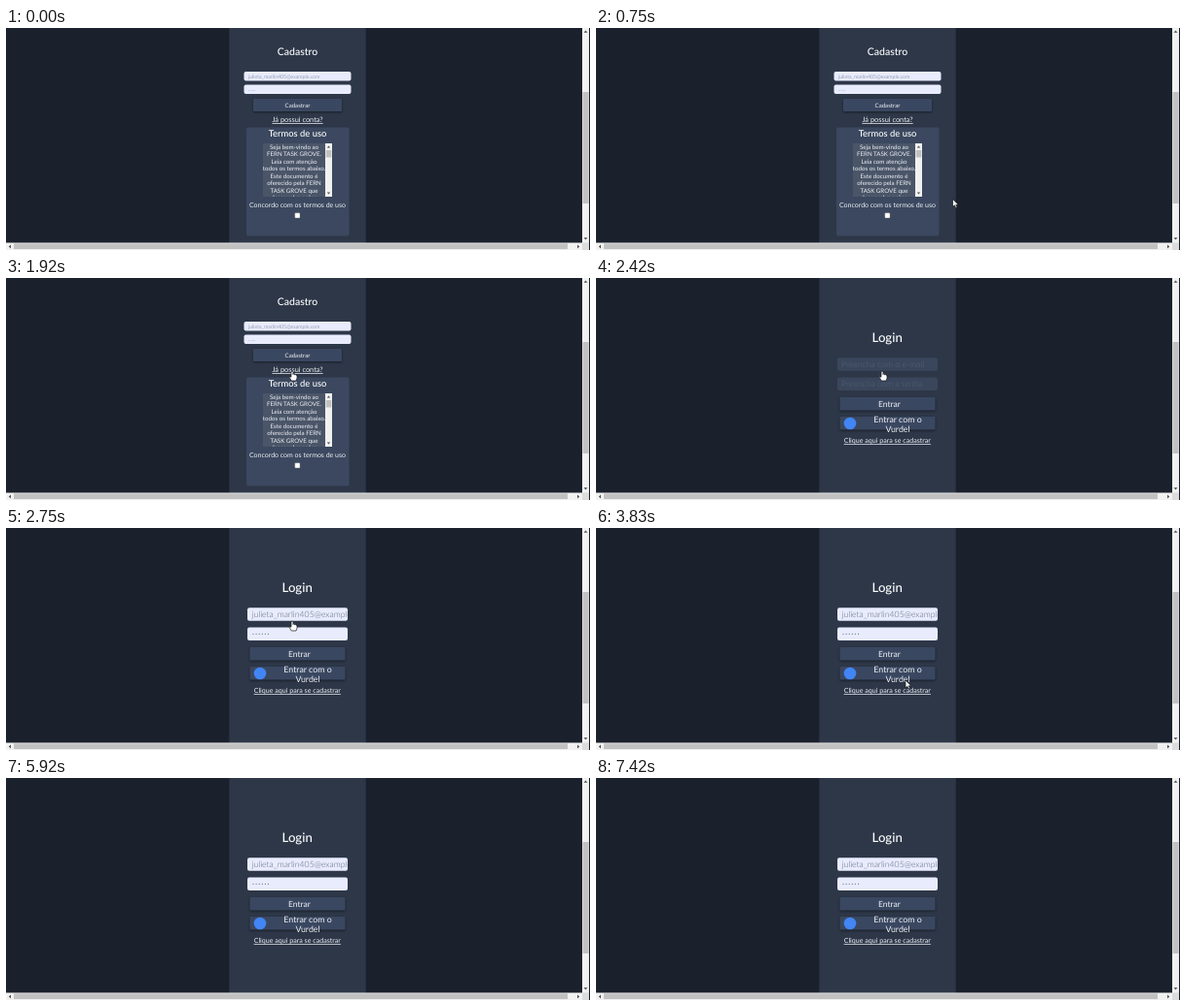
An HTML page that plays this animation: 600x229 px, repeating every 8000 ms.

```html
<!DOCTYPE html>
<html lang="pt">
<head>
<meta charset="utf-8">
<title>Cadastro e login</title>
<style>
  html, body { margin: 0; width: 100%; height: 100%; overflow: hidden; background: #1a202c; }
  svg { display: block; width: 100%; height: 100%; }
  text { font-family: Lato, "Open Sans", sans-serif; font-weight: 400; fill: #eef1f7; text-anchor: middle; text-rendering: geometricPrecision; }
  .title { font-weight: 500; fill: #fff; }
  .start { text-anchor: start; font-weight: 300; }
  .link { text-decoration: underline; text-decoration-thickness: .7px; }
  .filled { fill: #e8ecfd; }
  .empty { fill: #3a465b; }
  .typed { fill: #5c6579; }
  .hint { fill: #56647b; }
  .button { fill: #3a4760; filter: drop-shadow(0 1px 1px #0007); }
  .track { fill: #f1f1f1; }
  .thumb { fill: #c1c1c1; }
  .tick { fill: #505050; }
  #cursor path { fill: #fff; stroke: #15181f; stroke-width: .7; stroke-linejoin: round; }
</style>
</head>
<body>
<svg viewBox="0 0 600 229" preserveAspectRatio="none">
  <defs>
    <clipPath id="termsClip"><rect x="264" y="119" width="64" height="55"/></clipPath>
    <clipPath id="emailClip"><rect x="248" y="82" width="102.5" height="14"/></clipPath>
  </defs>
  <rect width="600" height="229" fill="#1a202c"/>
  <rect x="229.3" width="140.4" height="222" fill="#2d3748"/>

  <g id="signup">
    <text class="title" x="299.5" y="27.5" font-size="10.5">Cadastro</text>
    <rect class="filled" x="244.5" y="45" width="110" height="9.5" rx="2"/>
    <text class="start typed" x="249" y="52" font-size="5.3">julieta_marlin405@example.com</text>
    <rect class="filled" x="244.5" y="58.5" width="110" height="9.5" rx="2"/>
    <text class="start typed" x="249" y="64.5" font-size="5.3">......</text>
    <rect class="button" x="254" y="73" width="91" height="13" rx="1"/>
    <text x="299.5" y="81.5" font-size="6.1">Cadastrar</text>
    <text class="link" x="299.5" y="97" font-size="7.4">Já possui conta?</text>
    <rect x="247" y="102.5" width="105.5" height="112" rx="2" fill="#3b485f"/>
    <text class="title" x="299.5" y="112" font-size="9.4">Termos de uso</text>
    <rect x="264" y="119" width="64" height="55" fill="#4a5568"/>
    <g id="terms" clip-path="url(#termsClip)" font-size="6.2"></g>
    <rect class="track" x="328" y="119" width="7" height="55"/>
    <rect class="thumb" x="328.7" y="126" width="5.6" height="7.5"/>
    <path class="tick" d="M329.8 123.5l1.7-2 1.7 2zM329.8 169.5l1.7 2 1.7-2z"/>
    <text x="299.5" y="185" font-size="7">Concordo com os termos de uso</text>
    <rect x="296.8" y="190.8" width="5.2" height="5.2" rx=".7" fill="#fff" stroke="#767676" stroke-width=".4"/>
  </g>

  <g id="login">
    <text class="title" x="299.2" y="66.3" font-size="13.2">Login</text>
    <g id="blank">
      <rect class="empty" x="248" y="82.3" width="103" height="13.5" rx="2"/>
      <rect class="empty" x="248" y="102.5" width="103" height="13.5" rx="2"/>
      <g font-size="8.7">
        <text class="start hint" x="252" y="92.2">Preencha com o e-mail</text>
        <text class="start hint" x="252" y="112.2">Preencha com a senha</text>
      </g>
    </g>
    <g id="autofill">
      <rect class="filled" x="248" y="82.3" width="103" height="13.5" rx="2"/>
      <rect class="filled" x="248" y="102.5" width="103" height="13.5" rx="2"/>
      <g clip-path="url(#emailClip)">
        <text class="start typed" x="252.5" y="92.2" font-size="8.7">julieta_marlin405@example.com</text>
      </g>
      <path d="M254 109.3h16" stroke="#4a5263" stroke-width="1.1" stroke-linecap="round" stroke-dasharray="0 3.1"/>
    </g>
    <rect class="button" x="250.5" y="123" width="98" height="13.5" rx="1"/>
    <text x="301.5" y="133" font-size="8.5">Entrar</text>
    <rect class="button" x="250.5" y="143" width="98" height="13.5" rx="1"/>
    <circle cx="261" cy="150" r="6.3" fill="#4285f4"/>
    <text x="310" y="148.7" font-size="8.8">Entrar com o</text>
    <text x="310" y="159" font-size="8.8">Vurdel</text>
    <text class="link" x="299.3" y="170" font-size="7.1">Clique aqui para se cadastrar</text>
  </g>

  <rect class="track" x="592" width="7" height="222"/>
  <rect class="thumb" x="592.6" y="66" width="6" height="115"/>
  <rect class="track" y="221.5" width="599" height="7.5"/>
  <rect class="thumb" x="8" y="222.3" width="569" height="5.8"/>
  <rect x="592" y="221.5" width="7" height="7.5" fill="#dcdcdc"/>
  <path class="tick" d="M593.5 4.8l2-2.3 2 2.3zM593.5 216.2l2 2.3 2-2.3zM5 223.4l-2.2 2 2.2 2zM587 223.4l2.2 2-2.2 2z"/>

  <g id="cursor">
    <path id="arrow" d="M0 0V8L1.9 6.3 3.1 9 4.5 8.4 3.3 5.8H5.8Z"/>
    <path id="hand" d="M-1-.3Q0-1.7 1-.3V2.6Q2-1.1 2.6 2.9 3.6 2.1 4 3.3 5 2.9 5 4.2V6.3L4 9H-.7L-2.8 5.6Q-3.4 4-1 5.2Z"/>
  </g>
</svg>
<script>
const LOOP = 8000, FPS = 12;
const byId = id => document.getElementById(id);
const show = (id, visible) => byId(id).style.display = visible ? "" : "none";

const termLines = ["Seja bem-vindo ao", "FERN TASK GROVE.", "Leia com atenção", "todos os termos abaixo.",
  "Este documento é", "oferecido pela FERN", "TASK GROVE que", "desenvolve ações"];
byId("terms").innerHTML = termLines.map((line, i) =>
  `<text x="296" y="${124.6 + i * 7.5}">${line}</text>`).join("");

// Cursor stops: step (twelfths of a second), x, y
const stops = [[6, 398, 214], [10, 356, 164], [14, 325, 120.5], [15, 304, 92], [17, 300, 76], [20, 296, 84],
  [23, 294, 97], [40, 294, 97], [41, 293.4, 96.7], [42, 293, 97], [43, 293, 97],
  [44, 318, 157], [45, 318, 157], [49, 308, 158], [53, 300.5, 150.5], [71, 300.5, 150.5]];

function cursorAt(step) {
  const next = stops.findIndex(stop => stop[0] >= step);
  const [t1, x1, y1] = stops[next];
  const [t0, x0, y0] = stops[Math.max(0, next - 1)];
  const k = t1 === t0 ? 0 : (step - t0) / (t1 - t0);
  return [x0 + (x1 - x0) * k, y0 + (y1 - y0) * k];
}

function draw(now) {
  const step = Math.floor((now % LOOP) * FPS / 1000);
  show("signup", step < 29);
  show("login", step >= 29);
  show("blank", step < 33);
  show("autofill", step >= 33);

  const cursorVisible = step >= 6 && step < 71;
  show("cursor", cursorVisible);
  if (cursorVisible) {
    const isHand = step >= 15 && step < 35;
    show("hand", isHand);
    show("arrow", !isHand);
    byId("cursor").setAttribute("transform", `translate(${cursorAt(step)})`);
  }
}

const start = performance.now();
function tick() {
  draw(performance.now() - start);
  requestAnimationFrame(tick);
}
tick();
</script>
</body>
</html>
```
